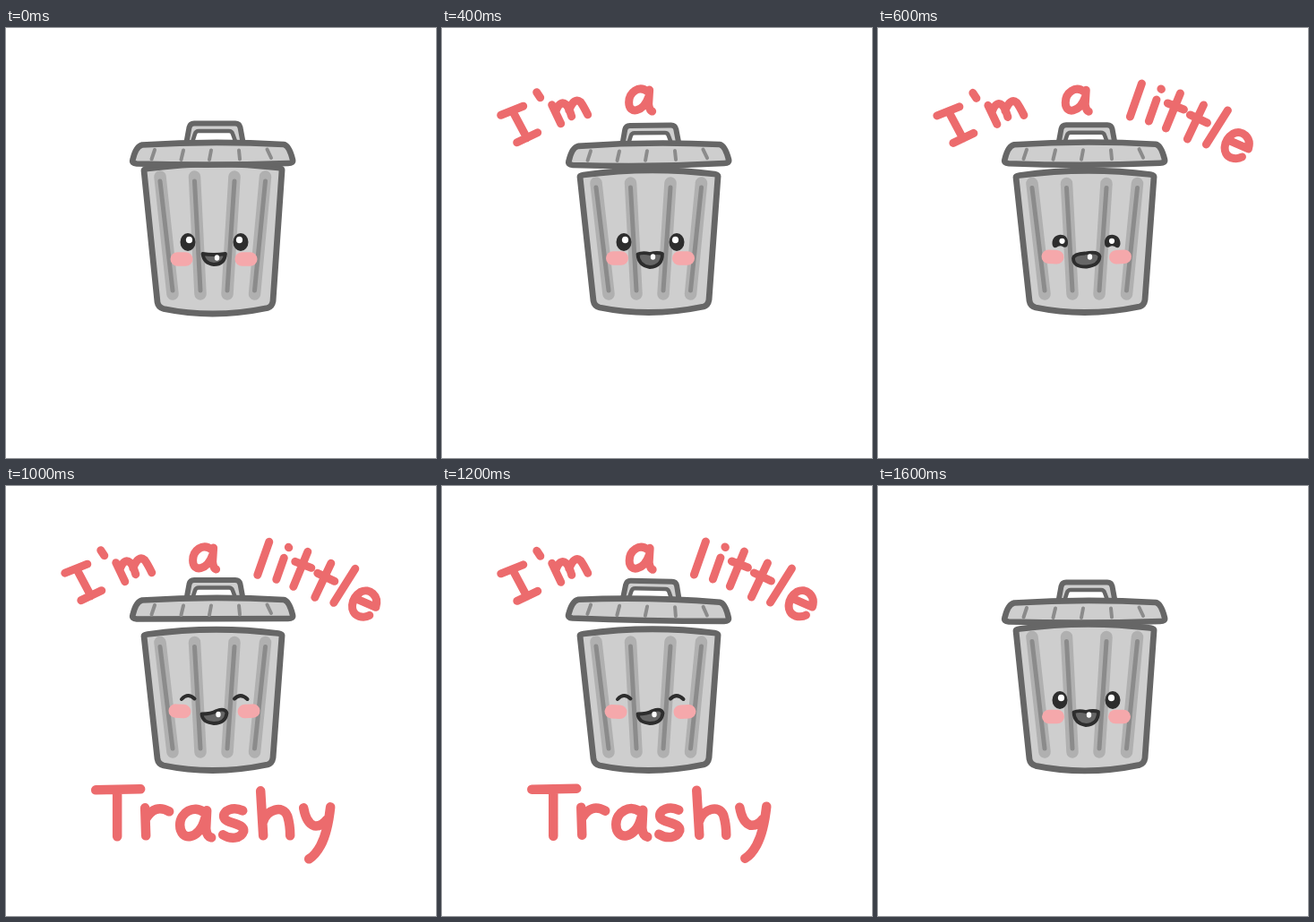
These frames come from a looping animation (480x480 px, 1.8 s). An HTML page:

```html
<!DOCTYPE html>
<html lang="en">
<head>
<meta charset="utf-8">
<title>I'm a little trashy</title>
<style>
html, body { margin: 0; width: 100%; height: 100%; overflow: hidden; background: #fff; }
svg { display: block; width: 100%; height: 100%; }
</style>
</head>
<body>
<svg id="stage" viewBox="0 0 480 480" role="img" aria-label="I'm a little Trashy"></svg>
<script>
const STEP = 200;
const GREY = '#666', METAL = '#cecece', RIB = '#b0b0b0', GROOVE = '#8b8b8b';
const INK = '#2d2d2d', PINK = '#f5a8ab', CORAL = '#ec6b6d';

// lid: [dy, angle, handle dy, sag]; top/sink: body edges; words: how many are shown
const poses = [
  { lid: [0, 0, 0, 1.5],        top: 156,   sink: 1.5, eyes: 'open',   mouth: 0, cheek: [196, 268, 258], words: 0 },
  { lid: [1.5, -1, 1, 2],       top: 162,   sink: 0,   eyes: 'open',   mouth: 1, cheek: [196, 269, 257.5], words: 1 },
  { lid: [0.7, -0.5, 1.5, 2],   top: 163,   sink: 0,   eyes: 'open',   mouth: 1, cheek: [195.5, 269.5, 257], words: 2 },
  { lid: [-0.3, 0, 2, 2],       top: 163.5, sink: 0,   eyes: 'half',   mouth: 2, cheek: [195, 270.5, 255.5], words: 3 },
  { lid: [-1.5, 0, 1, 1],       top: 164,   sink: 0,   eyes: 'closed', mouth: 3, cheek: [194, 271, 252], words: 4 },
  { lid: [-3, 0, 1.5, 0],       top: 164.5, sink: 0,   eyes: 'closed', mouth: 3, cheek: [194, 271, 251.3], words: 4 },
  { lid: [-2, 1.3, 1.7, 1],     top: 164,   sink: 0,   eyes: 'closed', mouth: 3, cheek: [194, 271, 252], words: 4 },
  { lid: [0, 2.7, 2, 2],        top: 163.5, sink: 0,   eyes: 'half',   mouth: 2, cheek: [195, 270.5, 255.5], words: 4 },
  { lid: [0, 0, 1, 1.5],        top: 158.5, sink: 0.3, eyes: 'open',   mouth: 1, cheek: [195.5, 269.5, 257.5], words: 0 }
];

const words = [
  // I'm
  'M66 97.500L91 87.500M79 93L95 123M84 128L107 117M106 72L110 78' +
  'M123 86L133 107M127 94Q132 80 139 86Q142 89 145 99M142 92Q148 77 155 83Q158 87 163 97',
  // a
  'M230 71C220 63 209 72 209 83C209 97 225 94 231 77M232 69L231 85Q232 92 235 93',
  // little
  'M294 62L281 99M315.500 68L316 68.500M310.500 80L302 104' +
  'M337 73L321 112M323 84L341 91' +
  'M363 86L345 124M348 97L367 106' +
  'M390 92L366 130' +
  'M390 125L413 135C417 122 406 113 396 118C385 125 383 141 394 145Q401 147 406 144',
  // Trashy
  'M100 339L150 338M124 340L124 391' +
  'M155 359L156 390M156 371Q166 354 182 363' +
  'M221 364C210 355 194 364 194 378C194 397 216 395 222 371M224 362L223 382Q224 391 229 392' +
  'M264 362C253 357 242 362 243 369C244 377 266 375 265 385C262 394 250 394 242 389' +
  'M284 340L287 390M287 374C291 361 309 355 314 368Q317 378 317 390' +
  'M332 359Q335 376 344 379Q352 380 358 372M362 358Q359 386 351 401Q345 412 338 416'
];

const path = (d, fill, stroke, w) =>
  `<path d="${d}" fill="${fill}" stroke="${stroke}" stroke-width="${w}" stroke-linecap="round" stroke-linejoin="round"/>`;
const line = (d, color, w) => path(d, 'none', color, w);
const ellipse = (x, y, rx, ry, fill) => `<ellipse cx="${x}" cy="${y}" rx="${rx}" ry="${ry}" fill="${fill}"/>`;
const group = (move, inner) => `<g transform="${move}">${inner}</g>`;

function body(top, sink) {
  const low = 311.5 + sink;
  const shell = `M154 ${top + 3}L169 ${low - 7}Q170 ${low - 1} 176 ${low + 0.5}Q232 ${low + 12} 292 ${low - 0.5}` +
    `Q297 ${low - 2} 298 ${low - 8}L308 ${top + 3}Q308.500 ${top + 1} 304 ${top}Q231 ${top - 9} 158 ${top + 1}Q154 ${top + 1.5} 154 ${top + 3}Z`;
  const ribs = [[172, 186], [210.5, 217], [255, 247], [289.5, 277.5]];
  return path(shell, METAL, GREY, 6.8) + ribs.map(([a, b]) =>
    line(`M${a} ${top + 10}L${b} 297`, RIB, 13.5) + line(`M${a} ${top + 15}L${b} 293`, GROOVE, 5)).join('');
}

function lid([dy, angle, lift, sag]) {
  const handle =
    path('M201 130L204.500 111Q205.500 106.500 210 106.500L256 106.500Q260.500 106.500 261.500 111L265 130Z', METAL, GREY, 6) +
    path('M207.500 129L211 118Q212 115 215 115L249 115Q252 115 253 118L257 129Z', '#fff', GREY, 4.5);
  const plate = `M141.500 147Q145 132 152 130.500Q231 125.500 310 130Q316 131 320 147Q321 151 315 151` +
    `Q231 ${151 + 2 * sag} 146 151.500Q140 151 141.500 147Z`;
  const slats = 'M166 136L162.500 146.500M198 136.500L195.500 147M229 136.500L227 147M260 136.500L261 146.500M291.500 135.500L296 145';
  return group(`translate(0 ${dy}) rotate(${angle} 231 141)`,
    group(`translate(0 ${lift})`, handle) + path(plate, METAL, GREY, 6.6) + line(slats, GROOVE, 4));
}

function eyes(kind) {
  if (kind === 'closed') return line('M196 238Q203 230.500 210.500 237.500M255 237.500Q262 230.500 269.500 238', INK, 4);
  if (kind === 'open') {
    return ellipse(203, 239, 8.5, 10, INK) + ellipse(262, 239, 8.5, 10, INK) +
      ellipse(204.5, 236.5, 3.6, 3.8, '#fff') + ellipse(260.5, 236.5, 3.6, 3.8, '#fff');
  }
  const shape = 'M194.500 241C194 227.500 213 227.500 212 240Q212 246 207 244.500Q203 242 199 245Q195 246 194.500 241Z';
  const half = `<path d="${shape}" fill="${INK}"/>`;
  return half + group('translate(465 0) scale(-1 1)', half) +
    ellipse(205.5, 237.8, 3.1, 3.1, '#fff') + ellipse(261, 237.8, 3.1, 3.1, '#fff');
}

// [outline, tooth x, tooth y]
const mouths = [
  ['M219.500 252Q232 254 245 252Q244 264 232 264Q221 263 219.500 252Z', 235.5, 256.5],
  ['M218.500 252.500Q224 250 232 252Q241 250 246 252Q246 266 232 267Q219 265 218.500 252.500Z', 235.5, 255.5],
  ['M218 257Q219 252 231 251.500Q246 248.500 247.500 255Q247 265 233 266.500Q218 267 218 257Z', 236.5, 255.5],
  ['M218.500 254.500Q229 254.500 235 251Q245 247.500 246.500 253.500Q245 265 232 265Q219 264 218.500 254.500Z', 237, 255]
];

function face({ eyes: kind, mouth, cheek: [l, r, y] }) {
  const [d, x, ty] = mouths[mouth];
  const cheek = (cx, tilt) =>
    `<rect x="${cx - 12.5}" y="${y - 7.7}" width="25" height="15.4" rx="8" fill="${PINK}" transform="rotate(${tilt} ${cx} ${y})"/>`;
  const tilt = mouth > 1 ? 3 : 0;
  return cheek(l, tilt) + cheek(r, -tilt) + eyes(kind) + path(d, GREY, INK, 3.8) + ellipse(x, ty, 2.7, 3.2, '#fff');
}

function lettering(count, step) {
  return words.slice(0, count).map((d, i) => {
    const dx = step === 1 ? 1.5 : 0.4 * Math.sin(step * 2 + i);
    const dy = step === 1 ? -1.5 : 0.4 * Math.cos(step * 2 + i);
    return group(`translate(${dx.toFixed(2)} ${dy.toFixed(2)})`, line(d, CORAL, i === 3 ? 10.5 : 9));
  }).join('');
}

const stage = document.getElementById('stage');
let shown = -1;

function draw(ms) {
  const step = Math.floor(ms / STEP) % poses.length;
  if (step !== shown) {
    shown = step;
    const p = poses[step];
    stage.innerHTML = body(p.top, p.sink) + lid(p.lid) + face(p) + lettering(p.words, step);
  }
}

const start = performance.now();
function tick() {
  draw(performance.now() - start);
  requestAnimationFrame(tick);
}
tick();
</script>
</body>
</html>
```
